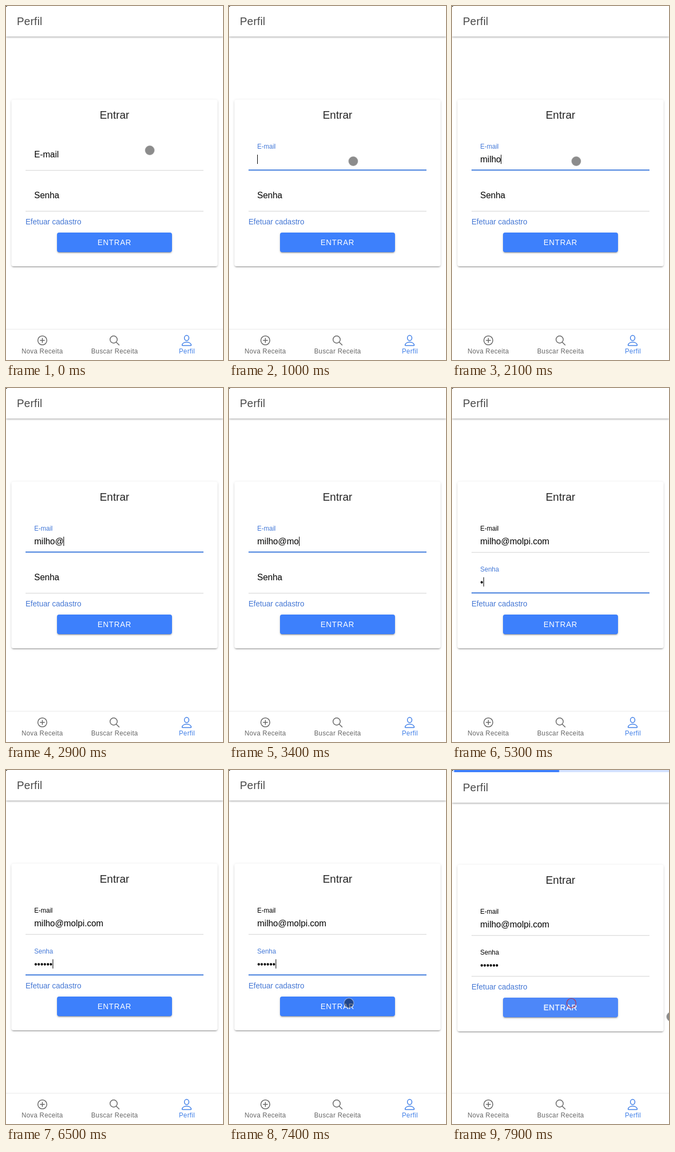
An HTML page that plays this animation: 400x650 px, repeating every 8000 ms.

```html
<!DOCTYPE html>
<html lang="pt">
<head>
<meta charset="utf-8">
<style>
  html, body { margin: 0; width: 100%; height: 100%; overflow: hidden; background: #fff; }
  div, svg { position: absolute; left: 0; top: 0; }
  #head { width: 400px; height: 56px; background: #fff;
    box-shadow: 0 2px 4px -1px rgba(0,0,0,.2), 0 1px 3px rgba(0,0,0,.22); }
  #card { left: 10px; top: 171.5px; width: 380px; height: 306.5px; border-radius: 4px; background: #fff; }
  #button { left: 84px; top: 244px; width: 212px; height: 36px; border-radius: 4px; }
  #card, #button { box-shadow: 0 3px 1px -2px rgba(0,0,0,.2), 0 2px 2px rgba(0,0,0,.14), 0 1px 5px rgba(0,0,0,.12); }
  text { font-family: "Liberation Sans", Arial, sans-serif; }
  .tab { font-size: 12px; letter-spacing: .36px; text-anchor: middle; fill: #666; }
  .icon { fill: none; stroke: #666; stroke-width: 1.5; stroke-linecap: round; stroke-linejoin: round; }
</style>
</head>
<body>
<div id="head"></div>
<div id="card"><div id="button"></div></div>
<svg width="400" height="650">
  <g id="title"><text x="20" y="35" font-size="20" letter-spacing=".25" fill="#484848">Perfil</text></g>
  <g id="form">
    <text x="200" y="207" font-size="20" text-anchor="middle" fill="#262626">Entrar</text>
    <rect id="line0" x="36"/><rect id="line1" x="36"/>
    <text id="label0" x="52">E-mail</text>
    <text id="label1" x="52">Senha</text>
    <text id="value0" x="52" y="287" font-size="16"></text>
    <text id="value1" x="52" y="362" font-size="16"></text>
    <rect id="caret" width="1" height="17"/>
    <text x="36" y="401" font-size="14" fill="#4477d4">Efetuar cadastro</text>
    <text id="enter" x="168.7" y="439" font-size="14" letter-spacing=".84" fill="#fff">ENTRAR</text>
  </g>
  <path d="M0 593.5H400" stroke="#e9e9e9"/>
  <g class="icon">
    <circle cx="67" cy="614" r="8.3"/><path d="M67 610v8M63 614h8"/>
    <circle cx="198.4" cy="612.4" r="6.6"/><path d="M203.2 617.2l5.3 5.3"/>
    <g stroke="#3f7fe8"><ellipse cx="333" cy="609.6" rx="4.1" ry="4.9"/>
    <path d="M333 617.3c-4 0-7.7 2-8.4 4.9q-.3 1.2.9 1.2h15q1.2 0 .9-1.2c-.7-2.9-4.4-4.9-8.4-4.9z"/></g>
  </g>
  <text class="tab" x="66.9" y="638">Nova Receita</text>
  <text class="tab" x="200.2" y="638">Buscar Receita</text>
  <text class="tab" x="333.5" y="638" style="fill:#3f7fe8">Perfil</text>
  <g id="progress"><rect width="400" height="4" fill="#d4e2ff"/><rect id="bar" height="4" fill="#3d7ffc"/></g>
  <rect width="2" height="1"/>
  <circle id="ring" cx="220" cy="428" r="8.5" fill="none" stroke="#b8324a" stroke-width="1.2"/>
  <circle id="pointer" r="9" fill="#000" fill-opacity=".45" stroke="#fff" stroke-opacity=".35" stroke-width="1.5"/>
</svg>
<script>
const LOOP = 8000, CLICK = 7500, FOCUS = [700, 4900];
const FULL = ['milho@molpi.com', '••••••'];
const KEYS = [
  [1300, 1450, 1600, 1750, 1900, 2900, 3150, 3350, 3550, 3700, 3850, 4150, 4350, 4500, 4650],
  [5200, 5450, 5700, 5900, 6100, 6300]
];
// time, x, y
const PATH = [[0, 265, 265], [100, 265, 265], [600, 229, 285], [6700, 229, 285],
  [7300, 221, 428], [7600, 221, 428], [7900, 404, 453], [8000, 425, 455]];

const el = id => document.getElementById(id);
const set = (id, attrs) => { for (const k in attrs) el(id).setAttribute(k, attrs[k]); };
const show = (id, on) => set(id, { visibility: on ? 'visible' : 'hidden' });
const mix = (a, b, p) => a + (b - a) * p;
const ramp = (t, from, length) => Math.min(1, Math.max(0, (t - from) / length));
const ease = p => p * p * (3 - 2 * p);

function pointerAt(t) {
  const i = PATH.findIndex(p => p[0] > t), a = PATH[i - 1], b = PATH[i];
  const p = ease(ramp(t, a[0], b[0] - a[0]));
  return { cx: mix(a[1], b[1], p), cy: mix(a[2], b[2], p) };
}

function drawField(i, t, active) {
  const y = 75 * i, p = ease(ramp(t, FOCUS[i], 150)), on = active === i;
  set('label' + i, { y: mix(278, 262, p) + y, 'font-size': mix(16, 12, p), fill: on ? '#4479d8' : '#000' });
  set('line' + i, { y: (on ? 300.3 : 301) + y, height: on ? 2 : 1.5,
    width: 328, fill: on ? '#3f7bdc' : '#e0e0e0' });
  const typed = KEYS[i].filter(k => k <= t);
  el('value' + i).textContent = FULL[i].slice(0, typed.length);
  if (on) {
    const last = typed.length ? typed[typed.length - 1] : FOCUS[i];
    const end = typed.length ? el('value' + i).getComputedTextLength() : 0;
    set('caret', { x: Math.round(52 + end), y: (i ? 347.5 : 273) });
    show('caret', (t - last) % 1000 < 500);
  }
}

function draw(t) {
  const sent = t >= CLICK;
  const active = sent || t < FOCUS[0] ? -1 : t < FOCUS[1] ? 0 : 1;
  show('caret', false);
  drawField(0, t, active);
  drawField(1, t, active);

  const shift = (n) => `translate(0,${sent ? n : 0})`;
  set('title', { transform: shift(4) });
  set('form', { transform: shift(2) });
  el('head').style.top = sent ? '4px' : 0;
  el('card').style.top = sent ? '173.5px' : '171.5px';
  el('button').style.background = sent ? '#4d87f9' : '#3d80fc';
  set('enter', { stroke: sent ? '#fff' : 'none', 'stroke-width': .4, 'fill-opacity': sent ? .85 : 1 });

  show('progress', sent);
  const p = (t - CLICK) / 400, left = mix(-36, 4, p);
  set('bar', { x: left, width: Math.max(0, mix(-4, 197, p) - left) });

  show('ring', sent);
  set('pointer', pointerAt(t));
  show('pointer', t < 2900 || t >= 6700);
}

function frame(now) {
  draw(now % LOOP);
  requestAnimationFrame(frame);
}
draw(0);
requestAnimationFrame(frame);
</script>
</body>
</html>
```
